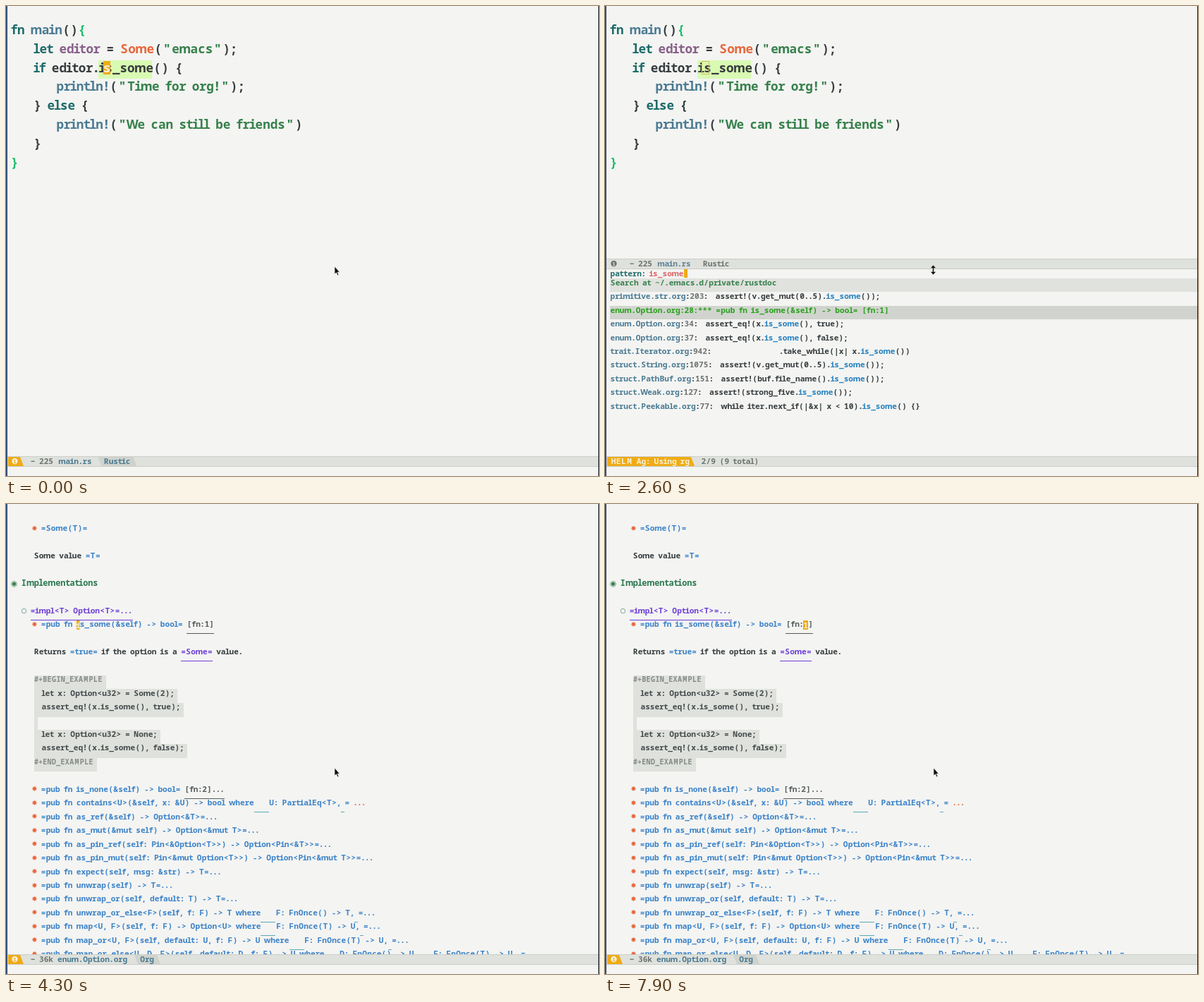
Animation, 841 px wide and 666 px high, one loop 8000 ms. Source, as an HTML page:

```html
<!DOCTYPE html>
<html lang="en">
<head>
<meta charset="utf-8">
<title>Rust documentation lookup in an editor</title>
<style>
html, body { margin: 0; width: 100%; height: 100%; overflow: hidden; background: #f4f4f2; }
svg { display: block; width: 841px; height: 666px; }
text { font: 600 11px "Noto Sans Mono", "DejaVu Sans Mono", monospace; text-anchor: middle; white-space: pre; }
.wide { font-family: "Noto Sans", sans-serif; }
.mark { font-family: "DejaVu Sans", sans-serif; font-weight: 400; }
</style>
</head>
<body>
<svg id="stage" viewBox="0 0 841 666"></svg>
<script>
const BIG = 17.6, SMALL = 11.15;
const INK = '#363c3e', GREY = '#6d7472', TEAL = '#1c6b69', STEEL = '#4a7a92', GREEN = '#36804c',
  ORANGE = '#e8673c', AMBER = '#f0ab16', BLUE = '#3a82c8', PURPLE = '#6d3fd6', LINK = '#555c5d',
  BAR = '#dfe1dc', CHIP = '#d0d3cd', LIGHT = '#f8f0d8', BRACE = '#14bd68', PAPER = '#f4f4f2';

// Quasi-proportional advances, in em.
const ADVANCES = [[/[ilj]/, .45], [/ /, .48], [/[ft]/, .51], [/[.,;:!]/, .52], [/r/, .56],
  [/"/, .78], [/m/, .9], [/[wWM]/, .82], [/[→←]/, 1], [/[A-Z<>=&\/~−()[\]-]/, .64]];
const advance = ch => (ADVANCES.find(([re]) => re.test(ch)) || [0, .6])[1];
const escape = ch => ({ '<': '&lt;', '>': '&gt;', '&': '&amp;' }[ch] || ch);
const glyph = ch => /[mwW]/.test(ch) ? `<tspan class="wide">${ch}</tspan>` : escape(ch);
const measure = (text, size) => [...text].reduce((sum, ch) => sum + advance(ch) * size, 0);

const rect = (x, y, w, h, fill) => `<rect x="${x}" y="${y}" width="${w}" height="${h}" fill="${fill}"/>`;
const shape = (d, fill, extra = '') => `<path d="${d}" fill="${fill}" ${extra}/>`;
const mark = (x, y, ch, fill, size) =>
  `<text class="mark" x="${x}" y="${y}" fill="${fill}" style="font-size:${size}px">${ch}</text>`;

// Runs alternate colour and text; a trailing "_" on the colour underlines the run.
function line(x, y, size, ...runs) {
  let out = '';
  const baseline = y + size * .365;
  for (let i = 0; i < runs.length; i += 2) {
    const fill = runs[i].replace('_', ''), from = x;
    const xs = [...runs[i + 1]].map(ch => {
      const w = advance(ch) * size;
      x += w;
      return (x - w / 2).toFixed(1);
    });
    out += `<text xml:space="preserve" x="${xs.join(' ')}" y="${baseline}" fill="${fill}" ` +
      `style="font-size:${size}px">${[...runs[i + 1]].map(glyph).join('')}</text>`;
    if (fill !== runs[i]) out += rect(Math.round(from), Math.round(y + 13), Math.round(x - from), 1, fill);
  }
  return out;
}
const small = (x, y, ...runs) => line(x, y, SMALL, ...runs);

function caret(x, y, w, h, ch, size) {
  return rect(x, y, w, h, AMBER) +
    `<text x="${x + w / 2}" y="${y + h / 2 + size * .365}" fill="${LIGHT}" style="font-size:${size}px">${ch}</text>`;
}

const frame = () => rect(0, 0, 2, 666, '#34507a') + rect(840, 0, 1, 666, '#15181c');
const echo = (...runs) => small(7.5, 659, ...runs);

function pointer(kind = 'arrow', y = 374) {
  if (kind === 'arrow') return shape(`M466 ${y}v11l2.4-2.2 1.8 4 1.7-.8-1.8-3.8h3.2z`, '#111',
    'stroke="#fff" stroke-width=".6"');
  if (kind === 'resize') return shape('M465.5 367l4 4.5h-3v5h3l-4 4.5-4-4.5h3v-5h-3z', '#111',
    'stroke="#fff" stroke-width=".5"');
  return shape('M463 369q3 0 3 1.5v9q0 1.5-3 1.5M469 369q-3 0-3 1.5m0 9q0 1.5 3 1.5', 'none',
    'stroke="#333"');
}

const barBase = y => rect(2, y, 838, 14, BAR) + rect(2, y, 838, 1, '#cbcec8') + rect(2, y + 14, 838, 1, '#cbcec8');

function modeline(y, size, name, mode, nameX, modeX, active = true) {
  const mid = y + 7, end = modeX + measure(mode, SMALL);
  let out = barBase(y);
  if (active) {
    out += shape(`M3 ${y + 1}H20L25 ${y + 14}H3z`, AMBER);
    out += shape(`M${modeX - 8} ${y + 1}H${end + 4}L${end + 9} ${y + 14}H${modeX - 3}z`, CHIP);
  }
  out += `<circle cx="12.5" cy="${mid}" r="4.2" fill="${active ? LIGHT : GREY}"/>` +
    `<text x="12.5" y="${mid + 2.8}" fill="${active ? AMBER : BAR}" style="font-size:7.5px">1</text>`;
  return out + small(34.5, mid, GREY, '− ' + size) +
    small(nameX, mid, active ? STEEL : '#5d8296', name) +
    small(modeX, mid, active ? STEEL : GREY, mode);
}

const CODE = [
  [7, TEAL, 'fn ', STEEL, 'main', INK, '()', BRACE, '{'],
  [39.5, TEAL, 'let ', '#865f88', 'editor', INK, ' = ', ORANGE, 'Some', INK, '(', GREEN, '"emacs"', INK, ');'],
  [39.5, TEAL, 'if ', INK, 'editor.is_some() {'],
  [71.5, STEEL, 'println!', INK, '(', GREEN, '"Time for org!"', INK, ');'],
  [39.5, INK, '} ', TEAL, 'else ', INK, '{'],
  [71.5, STEEL, 'println!', INK, '(', GREEN, '"We can still be friends"', INK, ')'],
  [39.5, INK, '}'],
  [7, BRACE, '}']
];

function code(focused) {
  const cursor = focused ? caret(138, 78, 10, 19, 's', BIG)
    : '<rect x="137.5" y="78.5" width="10" height="18" fill="none" stroke="#d9b95a"/>';
  return rect(131, 77, 76, 26, '#d9fab2') +
    CODE.map(([x, ...runs], i) => line(x, 33.5 + 26.85 * i, BIG, ...runs)).join('') + cursor;
}

const editor = (barY = 638) => code(true) + modeline(barY, '225', 'main.rs', 'Rustic', 74.5, 138.5);

// Columns of bindings: left edge of the key, row, key, command.
const BINDINGS = [
  [24, 0, 'a', 'org-agenda'], [24, 1, 'c', 'org-capture'], [23, 2, 'l', 'org-store-link'],
  [13, 3, 'C-g', 'search-rustdoc'], [13, 4, 'C-p', 'rustic-popup'], [13, 5, 'M-g', 'magit-file-dispatch'],
  [191, 0, '←', 'winner-undo'], [189, 1, '→', 'winner-redo'], [175, 2, 'ESC', '+prefix'],
  [197, 3, '!', '+prefix'], [191, 4, '@', '+prefix'], [199, 5, 'p', '+persp-key-map'],
  [321, 0, 'C-c', '+prefix'], [318, 1, 'C-w', '+prefix']
];

function keyGuide() {
  const colour = name => name[0] === '+' ? '#9478b6' : name === 'rustic-popup' ? '#3c9fe0' : '#58a3a8';
  return BINDINGS.map(([x, row, key, name]) =>
    small(x, 532 + 19.4 * row, PURPLE, key, '#7b8080', ' → ', colour(name), name)).join('') +
    echo(INK, 'C-c-  ', GREY, '[C-h paging/help]');
}

const MATCHES = [
  ['primitive.str', 203, '  assert!(v.get_mut(0..5).is_some());'],
  ['enum.Option', 28, '*** =pub fn is_some(&self) -> bool= [fn:1]'],
  ['enum.Option', 34, '  assert_eq!(x.is_some(), true);'],
  ['enum.Option', 37, '  assert_eq!(x.is_some(), false);'],
  ['trait.Iterator', 942, ' '.repeat(18) + '.take_while(|x| x.is_some())'],
  ['struct.String', 1075, '  assert!(v.get_mut(0..5).is_some());'],
  ['struct.PathBuf', 151, '  assert!(buf.file_name().is_some());'],
  ['struct.Weak', 127, '  assert!(strong_five.is_some());'],
  ['struct.Peekable', 77, '  while iter.next_if(|&x| x < 10).is_some() {}']
];

function search(selected) {
  let out = code(false) + modeline(358, '225', 'main.rs', 'Rustic', 74.5, 138.5, false);
  out += small(7.5, 379, TEAL, 'pattern: ', '#da6467', 'is_some') + rect(112, 373, 5, 12, AMBER);
  out += rect(7, 386, 833, 19, '#e0e2dd') + small(7.5, 392, GREEN, 'Search at ~/.emacs.d/private/rustdoc');
  MATCHES.forEach(([file, number, text], i) => {
    const y = 411.3 + 19.42 * i, pick = c => i === selected ? '#28a01c' : c;
    const [before, after] = text.split('is_some');
    if (i === selected) out += rect(7, Math.round(y - 6), 833, 19, '#d1d4ce');
    out += small(7.5, y, pick(STEEL), file + '.org', pick(INK), ':', pick(GREY), '' + number, pick(INK), ':' + before,
      pick('#2380c0'), 'is_some', pick(INK), after);
  });
  return out + barBase(638) + shape('M3 639H122L127 652H3z', AMBER) + small(8.5, 645, LIGHT, 'HELM Ag: Using rg') +
    small(136.5, 645, GREY, `${selected + 1}/9 (9 total)`) + pointer('resize');
}

// "|" stands for the folded break inside a where clause.
const METHODS = [
  'is_none(&self) -> bool',
  'contains<U>(&self, x: &U) -> bool where|U: PartialEq<T>,',
  'as_ref(&self) -> Option<&T>',
  'as_mut(&mut self) -> Option<&mut T>',
  'as_pin_ref(self: Pin<&Option<T>>) -> Option<Pin<&T>>',
  'as_pin_mut(self: Pin<&mut Option<T>>) -> Option<Pin<&mut T>>',
  'expect(self, msg: &str) -> T',
  'unwrap(self) -> T',
  'unwrap_or(self, default: T) -> T',
  'unwrap_or_else<F>(self, f: F) -> T where|F: FnOnce() -> T,',
  'map<U, F>(self, f: F) -> Option<U> where|F: FnOnce(T) -> U,',
  'map_or<U, F>(self, default: U, f: F) -> U where|F: FnOnce(T) -> U,',
  'map_or_else<U, D, F>(self, default: D, f: F) -> U where|D: FnOnce() -> U,|F: FnOnce(T) -> U,',
  'ok_or<E>(self, err: E) -> Result<T, E>',
  'ok_or_else<E, F>(self, err: F) -> Result<T, E> where|F: FnOnce() -> E,',
  'iter(&self) -> Iter<T>',
  'iter_mut(&mut self) -> IterMut<T>',
  'and<U>(self, optb: Option<U>) -> Option<U>',
  'and_then<U, F>(self, f: F) -> Option<U> where|F: FnOnce(T) -> Option<U>,',
  'filter<P>(self, predicate: P) -> Option<T> where|P: FnOnce(&T) -> bool,',
  'or(self, optb: Option<T>) -> Option<T>',
  'or_else<F>(self, f: F) -> Option<T> where|F: FnOnce() -> Option<T>,',
  'xor(self, optb: Option<T>) -> Option<T>',
  'get_or_insert(&mut self, v: T) -> &mut T'
];
const EXAMPLE = ['#+BEGIN_EXAMPLE', 'let x: Option<u32> = Some(2);', 'assert_eq!(x.is_some(), true);', '',
  'let x: Option<u32> = None;', 'assert_eq!(x.is_some(), false);', '#+END_EXAMPLE'];

const rowY = n => 34.2 + 19.45 * n;
const item = (row, ...runs) => mark(40.5, rowY(row) + 3.6, '✸', ORANGE, 10) + small(49.5, rowY(row), ...runs);

function method(signature, row) {
  const runs = [BLUE, '=pub fn '], parts = signature.split('|');
  parts.forEach((part, i) => {
    if (i) runs.push('#5aa9b4_', '    ');
    runs.push(BLUE, part);
  });
  if (parts.length > 1) runs.push('#5aa9b4_', ' ');
  if (signature.startsWith('is_none')) runs.push(BLUE, '= ', LINK + '_', '[fn:2]...');
  else if (signature.startsWith('contains')) runs.push(BLUE, '=', ORANGE, ' ...');
  else runs.push(BLUE, '=...');
  return item(row, ...runs);
}

function example() {
  return EXAMPLE.map((text, i) => {
    const y = rowY(11 + i), fence = text[0] === '#';
    const x = fence || !text ? 40 : 50.5, size = fence ? 10 : SMALL;
    const edge = Math.round(x + measure(text, size) + 5);
    return rect(40, Math.round(y - 5.5), edge - 40, 20, BAR) + line(x, y, size, fence ? '#828987' : '#434a4b', text);
  }).join('');
}

function manual({ folded = false, cursor = [100, 4.5, 'i'], message = '', mouse = 'arrow' }) {
  let out = item(0, BLUE, '=Some(T)=') + small(39.5, rowY(2), INK, 'Some value ', BLUE, '=T=');
  out += mark(11.5, rowY(4) + 4, '◉', GREEN, 10.5) + line(21.5, rowY(4), 11.9, '#2b7850', 'Implementations');
  out += mark(25.5, rowY(6) + 3.5, '○', TEAL, 9) + small(34.5, rowY(6), PURPLE + '_', '=impl<T> Option<T>=...');
  out += item(7, BLUE, '=pub fn is_some(&self) -> bool= ', LINK + '_', folded ? '[fn:1]...' : '[fn:1]');
  if (!folded) {
    out += small(39.5, rowY(9), INK, 'Returns ', BLUE, '=true=', INK, ' if the option is a ',
      PURPLE + '_', '=Some=', INK, ' value.') + example();
  }
  const first = folded ? 8 : 19;
  out += METHODS.slice(0, 32 - first).map((m, i) => method(m, first + i)).join('');
  const [x, w, ch] = cursor;
  out += caret(x, 165, w, 13, ch, SMALL);
  out += rect(2, 638, 838, 28, PAPER) + modeline(638, '36k', 'enum.Option.org', 'Org', 73, 190);
  return out + echo(INK, message) + pointer(mouse);
}

const STEPS = [
  [0, () => editor() + pointer('arrow', 369)],
  [100, () => editor() + pointer()],
  [1200, () => editor() + echo(INK, 'C-c-') + pointer()],
  [1300, () => editor(511) + keyGuide() + pointer()],
  [1600, () => search(0)],
  [2600, () => search(1)],
  [2700, () => search(2)],
  [3300, () => search(1)],
  [4300, () => manual({})],
  [4400, () => manual({ message: 'Wrong number of arguments: (1 . 1), 0' })],
  [6900, () => manual({ folded: true, message: 'FOLDED', mouse: 'text' })],
  [7100, () => manual({ message: 'SUBTREE' })],
  [7700, () => manual({ cursor: [288, 7, ']'] })],
  [7900, () => manual({ cursor: [281, 7, '1'] })]
];

const stage = document.getElementById('stage');
let shown = -1;

function render(time) {
  const step = STEPS.findLastIndex(([at]) => at <= time);
  if (step === shown) return;
  shown = step;
  stage.innerHTML = rect(0, 0, 841, 666, PAPER) + STEPS[step][1]() + frame();
}

function tick() {
  render(performance.now() % 8000);
  requestAnimationFrame(tick);
}
tick();
</script>
</body>
</html>
```
